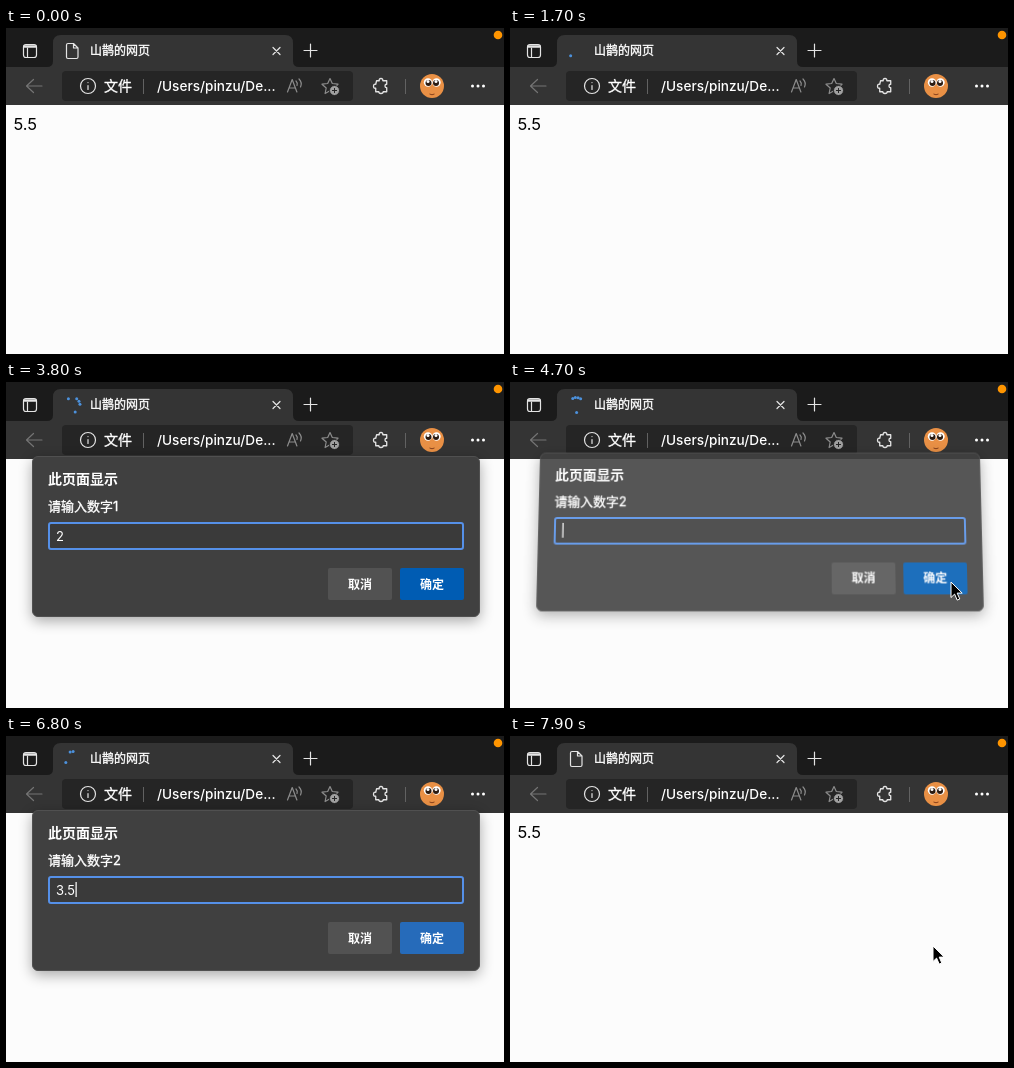
An HTML page for the animation above (8000 ms loop, 498 by 326 pixels).

```html
<!DOCTYPE html>
<html lang="zh-CN">
<head>
<meta charset="utf-8">
<style>
html, body { margin: 0; width: 100%; height: 100%; overflow: hidden; background: #fcfcfc; }
svg { position: absolute; left: 0; top: 0; font-family: Inter, "Noto Sans CJK SC", "Noto Sans CJK", sans-serif; fill: #fff; }
.line { fill: none; stroke: #e4e4e4; stroke-width: 1.2; stroke-linecap: round; stroke-linejoin: round; }
.dim { stroke: #8c8c8c; }
.medium { stroke: #fff; stroke-width: .35; }
#dialog { position: absolute; left: 26px; top: 74px; width: 448px; height: 161px; box-sizing: border-box;
  background: #404040; border: 1px solid #505050; border-radius: 6px; box-shadow: 0 4px 14px #0005;
  transform-origin: 50% 100%; }
#dialog svg { left: -1px; top: -1px; }
#menu rect { filter: drop-shadow(0 2px 5px #0006); }
</style>
</head>
<body>
<svg width="498" height="326">
  <rect width="498" height="39" fill="#1b1b1b"/>
  <path d="M41 39q6 0 6-6V15q0-8 8-8h224q8 0 8 8v18q0 6 6 6z" fill="#343434"/>
  <rect y="39" width="498" height="38" fill="#343434"/>
  <rect x="56" y="43" width="291" height="30" rx="4" fill="#252525"/>

  <!-- tab strip -->
  <g class="line">
    <rect x="17.500" y="16.500" width="13" height="13" rx="2.500"/>
    <path d="M18.500 18.500h11" stroke-width="2.600"/>
    <path d="M21.500 20v9"/>
    <path id="page" d="M62 15.500h5.500l4.500 4.500v9q0 1.500-1.500 1.500h-8.500q-1.500 0-1.500-1.500v-12q0-1.500 1.500-1.500zM67.500 15.500v4.500h4.500"/>
    <path d="M267 19.500l7 7m0-7l-7 7M298 22.500h13M304.500 16v13"/>
  </g>
  <g id="spinner" fill="#4c91dc"></g>
  <text class="medium" x="84" y="27" font-size="12">山鹊的网页</text>
  <circle cx="492" cy="7" r="4.300" fill="#ff9500"/>

  <!-- toolbar -->
  <path class="line" d="M36 58H20.500l7-6.500m-7 6.500l7 6.500" style="stroke:#747474"/>
  <g class="line">
    <circle cx="82" cy="58" r="7.500"/>
    <path d="M82 57.500v4M82 54.500v.1"/>
    <path d="M370 52.500h3q-.5-2.500 2-2.500t2 2.500h4.500v4q-2 0-2 2t2 2v4.500h-4q0 2-2.500 2t-2.500-2h-3.500v-4q-2.500.5-2.500-2.200t2.500-2.300z"
      transform="translate(375 58) scale(.88) translate(-375 -58.500)" stroke-width="1.500"/>
  </g>
  <text class="medium" x="98" y="63" font-size="14">文件</text>
  <path d="M137.500 51v15M399.500 51v15" stroke="#626262"/>
  <text x="151" y="63" font-size="13.600" font-weight="500">/Users/pinzu/De...</text>
  <g class="line dim">
    <path d="M281.500 64l4.700-12.500 4.700 12.500M283.300 60h5.800M290 53q2 2 1 4.500M293 51q3.500 3.500 1.500 8"/>
    <path d="M324 50.500l2.300 5 5.700.7-4.200 3.800 1.100 5.500-4.900-2.700-4.900 2.700 1.100-5.500-4.200-3.800 5.700-.7z"/>
  </g>
  <circle cx="328.500" cy="62.500" r="5" fill="#a0a0a0" stroke="#252525"/>
  <path d="M326 62.500h5M328.500 60v5" stroke="#252525"/>
  <circle cx="426" cy="58" r="12" fill="#e99045"/>
  <circle cx="422" cy="54.500" r="4.200"/><circle cx="430.500" cy="54.500" r="4.200"/>
  <g fill="#2b1a10">
    <circle cx="422.500" cy="55" r="3"/><circle cx="430" cy="55" r="3"/>
    <path d="M423.500 66q2.500 1.500 5 0" fill="none" stroke="#87401b"/>
  </g>
  <circle cx="422" cy="53.500" r="1.500"/><circle cx="430" cy="53.500" r="1.500"/>
  <circle cx="466.500" cy="58" r="1.500"/><circle cx="472" cy="58" r="1.500"/><circle cx="477.500" cy="58" r="1.500"/>

  <text id="result" x="7.500" y="102" font-size="16.500" fill="#000">5.5</text>

  <g id="menu" font-size="13">
    <rect x="15" y="219.500" width="280.500" height="130" rx="5" fill="#3d3d3d" stroke="#555"/>
    <path d="M15 260.500h280" stroke="#565656"/>
    <path class="line" d="M46 233l-6 6m0-4.500v4.500h4.500M30.500 247.500l6-6m-4.500 0h4.500v4.500"/>
    <path class="line dim" d="M46 281H30.500l6.500-6m-6.500 6l6.500 6M30.500 313H46l-6.500-6m6.500 6l-6.500 6"/>
    <text class="medium" x="58" y="245">退出全屏</text>
    <text x="254" y="245" text-anchor="end" font-weight="500">(fn) F</text>
    <g fill="#929292">
      <text x="58" y="286">返回</text><text x="255" y="286" text-anchor="end">⌘[</text>
      <text x="58" y="318">前进</text><text x="255" y="318" text-anchor="end">⌘]</text>
    </g>
  </g>
</svg>

<div id="dialog">
  <svg width="448" height="161">
    <text x="16" y="28" font-size="14" font-weight="700">此页面显示</text>
    <text id="prompt" class="medium" x="16" y="55" font-size="13"></text>
    <rect x="17" y="67" width="414" height="26" rx="2" fill="#3a3a3a" stroke="#5590e8" stroke-width="2"/>
    <text id="value" x="24" y="84.500" font-size="13"></text>
    <rect id="caret" y="72" width="1.200" height="15"/>
    <rect x="296" y="112" width="64" height="32" rx="2" fill="#525252"/>
    <rect id="ok" x="368" y="112" width="64" height="32" rx="2"/>
    <g font-size="12" font-weight="700" text-anchor="middle">
      <text x="328" y="132.500">取消</text><text x="400" y="132.500">确定</text>
    </g>
  </svg>
</div>

<svg width="498" height="326">
  <path id="mouse" d="M0 0v15.500l3.600-3.400 2.600 6 2.600-1.100-2.600-5.900h5z" fill="#000" stroke="#fff"/>
</svg>

<script>
const LOOP = 8000, STEP = 100;
const $ = id => document.getElementById(id);
const clamp = v => Math.max(0, Math.min(1, v));
const ramp = (t, start, length) => clamp((t - start) / length);
const within = (t, a, b) => t >= a && t < b;
const show = (id, on) => $(id).style.display = on ? "" : "none";

const easeOut = x => 1 - (1 - x) ** 2;
const easeInOut = x => x * x * (3 - 2 * x);
const linear = x => x;
// cycle fraction, angle reached, easing towards it
const orbit = [[0, 225, linear], [.07, 345, easeOut], [.3, 455, linear],
  [.39, 690, easeInOut], [.7, 815, linear], [.75, 945, easeOut]];

$("spinner").innerHTML = '<circle r="1.500"/>'.repeat(5);

function drawSpinner(t) {
  const on = within(t, 1700, 7800);
  show("page", !on);
  show("spinner", on);
  const time = t - 1690 + (t >= 4900 ? 1000 : 0);
  [...$("spinner").children].forEach((dot, i) => {
    const local = time - 290 * i;
    const u = local % 5500 / 5500;
    const k = orbit.findIndex(key => u < key[0]);
    const visible = local >= 0 && k > 0;
    dot.style.display = visible ? "" : "none";
    if (!visible) return;
    const [u0, a0] = orbit[k - 1], [u1, a1, ease] = orbit[k];
    const angle = (a0 + (a1 - a0) * ease((u - u0) / (u1 - u0))) * Math.PI / 180;
    dot.setAttribute("cx", 66.5 + 7.5 * Math.sin(angle));
    dot.setAttribute("cy", 23 - 7.5 * Math.cos(angle));
  });
}

function drawDialog(t) {
  const second = t >= 4500;
  const [open, close] = second ? [4540, 7550] : [1940, 4350];
  const p = Math.min(ramp(t, open, 180), 1 - ramp(t, close, 150));
  show("dialog", p > 0);
  if (p <= 0) return;
  const k = Math.min(3, (1 - p) / .11);
  const style = $("dialog").style;
  style.opacity = p;
  style.transform = k ? `perspective(1000px) translateY(${-5.5 * k}px) scaleY(${1 + .012 * k}) rotateX(${6.5 * k}deg)` : "none";

  const keys = second ? [[5400, "3"], [5900, "3."], [6400, "3.5"]] : [[3200, "2"]];
  const [since, text] = keys.filter(key => t >= key[0]).pop() || [open, ""];
  $("prompt").textContent = "请输入数字" + (second ? 2 : 1);
  $("value").textContent = text;
  $("caret").setAttribute("x", 24.5 + $("value").getComputedTextLength());
  show("caret", (t - since) % 1000 < 500);
  const hover = t >= (second ? 4800 : 4200);
  $("ok").setAttribute("fill", hover ? "#266bba" : "#005cb3");
}

function drawMouse(t) {
  show("mouse", within(t, 3900, 5400) || t >= 7100);
  const up = easeOut(ramp(t, 3900, 400)), back = easeInOut(ramp(t, 7100, 400));
  $("mouse").setAttribute("transform", `translate(${452 - 11 * up - 18 * back} ${275 - 75 * up + 10 * back})`);
}

function frame(now) {
  const t = Math.floor(now % LOOP / STEP) * STEP;
  $("menu").style.opacity = Math.min(ramp(t, 400, 100), 1 - ramp(t, 1300, 200));
  show("result", t < 1900 || t >= 7700);
  drawSpinner(t);
  drawDialog(t);
  drawMouse(t);
  requestAnimationFrame(() => frame(performance.now() - start));
}
const start = performance.now();
frame(0);
</script>
</body>
</html>
```
